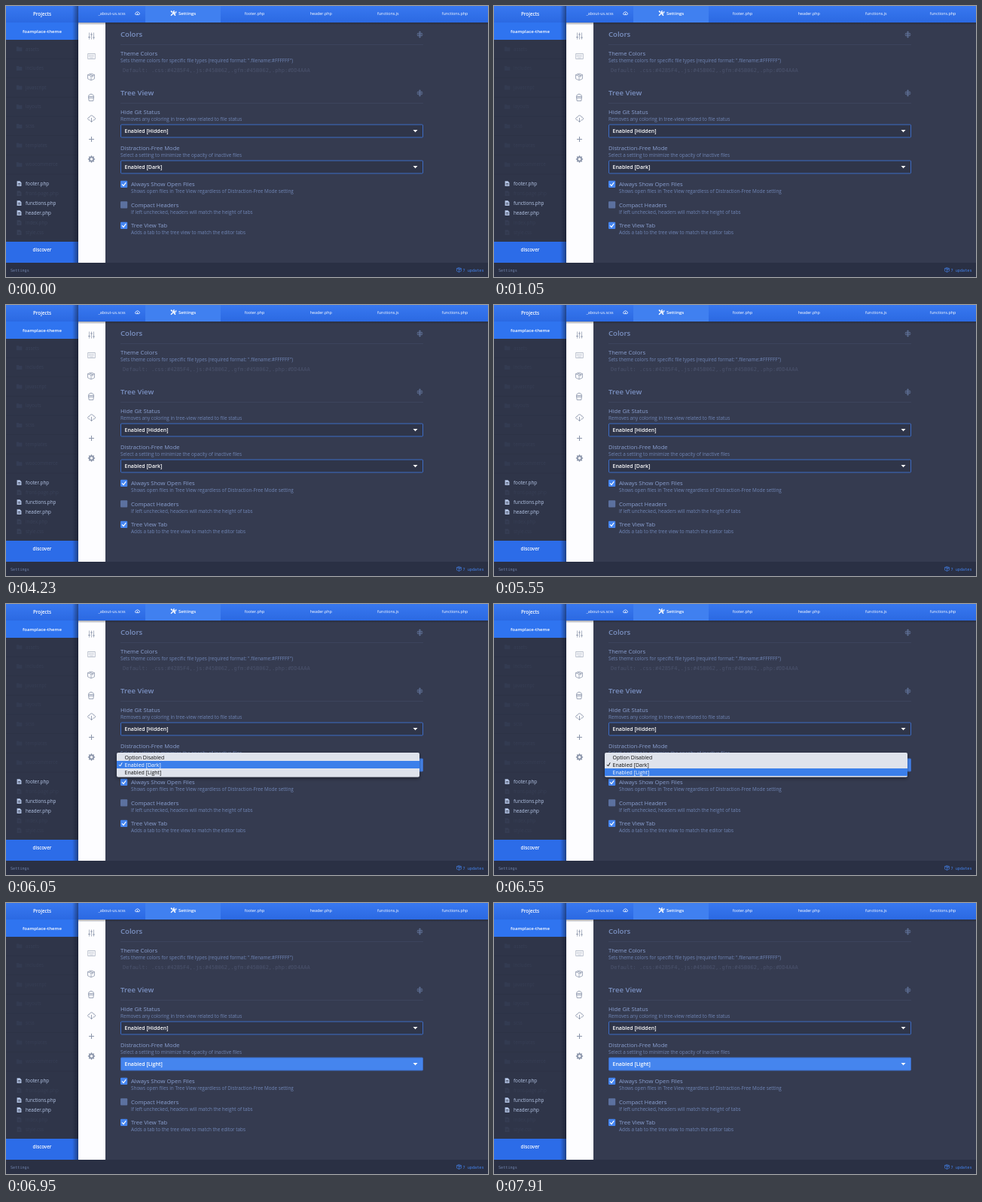
Recreate the animation shown at these times as an HTML page. Size 640 by 361 pixels, loop 8000 ms.

```html
<!DOCTYPE html>
<html lang="en">
<head>
<meta charset="utf-8">
<title>Editor settings</title>
<style>
html, body { margin: 0; width: 100%; height: 100%; overflow: hidden; background: #353b50; }
svg { display: block; width: 640px; height: 361px; }
text { font-family: "Open Sans", "Noto Sans", sans-serif; white-space: pre; }
.mono { font-family: "DejaVu Sans Mono", monospace; }
</style>
</head>
<body>
<svg id="stage" viewBox="0 0 640 361" xmlns="http://www.w3.org/2000/svg">
  <defs>
    <linearGradient id="bar" x2="0" y2="1">
      <stop offset="0" stop-color="#3878f0"/><stop offset="1" stop-color="#2b69e2"/>
    </linearGradient>
    <linearGradient id="shade" x2="0" y2="1">
      <stop offset="0" stop-color="#161b2b" stop-opacity=".4"/><stop offset="1" stop-color="#161b2b" stop-opacity="0"/>
    </linearGradient>
    <linearGradient id="edge">
      <stop offset="0" stop-color="#10162a" stop-opacity="0"/><stop offset="1" stop-color="#10162a" stop-opacity=".5"/>
    </linearGradient>
    <filter id="drop" x="-5%" y="-20%" width="110%" height="150%">
      <feDropShadow dx="0" dy="2" stdDeviation="2.5" flood-color="#000" flood-opacity=".4"/>
    </filter>
  </defs>
</svg>
<script>
const LOOP = 8000;
const FADE_IN = [1700, 2250], FADE_OUT = [3650, 4300];
const MENU_OPEN = 5850, MENU_PICK = 6400, MENU_FADE = [6690, 6870];
const DIM = 0.08;
const FIELD = '#2f3549', FOCUS = '#4585ee';
const stage = document.getElementById('stage');

function add(tag, attrs, parent = stage) {
  const el = document.createElementNS('http://www.w3.org/2000/svg', tag);
  for (const k in attrs) el.setAttribute(k, attrs[k]);
  parent.appendChild(el);
  return el;
}
const rect = (x, y, width, height, fill, more = {}, parent) =>
  add('rect', { x, y, width, height, fill, ...more }, parent);
const text = (x, y, str, size, fill, more = {}, parent) => {
  const el = add('text', { x, y, 'font-size': size, fill, ...more }, parent);
  el.textContent = str;
  return el;
};
const line = (d, stroke, x = 0, y = 0, more = {}, parent) =>
  add('path', { d, stroke, fill: 'none', 'stroke-width': 0.9, transform: `translate(${x} ${y})`, ...more }, parent);
const shape = (d, fill, x = 0, y = 0, parent) =>
  add('path', { d, fill, 'fill-rule': 'evenodd', transform: `translate(${x} ${y})` }, parent);

const bold = { 'font-weight': 600 };
const mid = { 'text-anchor': 'middle' };
const midBold = { ...mid, ...bold };

// Gear outline with eight teeth and a hole
function gear(r) {
  let d = '';
  for (let i = 0; i < 32; i++) {
    const a = (i - 0.5) * Math.PI / 16, q = i % 4 < 2 ? r : r * 0.76;
    d += (i ? 'L' : 'M') + (q * Math.cos(a)).toFixed(2) + ' ' + (q * Math.sin(a)).toFixed(2);
  }
  const h = r * 0.38;
  return `${d}ZM${h} 0A${h} ${h} 0 1 0 ${-h} 0A${h} ${h} 0 1 0 ${h} 0Z`;
}
const BOX = 'M0 -4.5L4.5 -2.8V2.4L0 4.5L-4.5 2.4V-2.8ZM-4.5 -2.8L0 -1L4.5 -2.8M0 -1V4.5M-2.2 -3.7L2.2 -1.9V.5';

// Main panel
rect(0, 0, 640, 361, '#353b50');

function heading(y, str) {
  text(152, y + 3.4, str, 9.6, '#7b91c2', bold);
  line('M0 -4V4M-4 0H4M-1.8 -2.5L0 -4L1.8 -2.5M-1.8 2.5L0 4L1.8 2.5M-3.5 -1.4H3.5M-3.5 1.4H3.5', '#7186b4', 549.5, y, { 'stroke-width': 0.6 });
  rect(152, y + 13, 402, 0.6, '#414a64');
}
const label = (x, y, str) => text(x, y, str, 7.6, '#8ba1d2');
const note = (x, y, str) => text(x, y, str, 6.37, '#7086b6');

function select(y, value) {
  const box = rect(152.5, y + 0.5, 401, 17, FIELD, { stroke: '#3d6cc4', rx: 1 });
  const str = text(157.5, y + 11.2, value, 7, '#fff', bold);
  shape('M-3 -1.5H3L0 1.8Z', '#fff', 543.5, y + 9);
  return { box, str };
}
function check(y, on, title, info) {
  rect(152, y, 9.2, 9.2, on ? '#4585f0' : '#5c719f', { rx: 1 });
  if (on) line('M2 4.7L4 6.8L7.3 2.4', '#fff', 152, y, { 'stroke-width': 1.2 });
  label(166, y + 7.4, title);
  note(166, y + 16.5, info);
}

heading(38, 'Colors');
label(152, 65.5, 'Theme Colors');
note(152, 74.7, 'Sets theme colors for specific file types (required format: ".filename:#FFFFFF")');
text(155, 88, 'Default: .css:#4285F4,.js:#45B062,.gfm:#45B062,.php:#DD4AAA', 7, '#4b536d', { class: 'mono' });
heading(116, 'Tree View');
label(152, 144, 'Hide Git Status');
note(152, 153, 'Removes any coloring in tree-view related to file status');
select(157.5, 'Enabled [Hidden]');
label(152, 192, 'Distraction-Free Mode');
note(152, 201, 'Select a setting to minimize the opacity of inactive files');
const mode = select(205.5, 'Enabled [Dark]');
check(232.7, true, 'Always Show Open Files', 'Shows open files in Tree View regardless of Distraction-Free Mode setting');
check(260.2, false, 'Compact Headers', 'If left unchecked, headers will match the height of tabs');
check(287.7, true, 'Tree View Tab', 'Adds a tab to the tree view to match the editor tabs');

// Icon strip
rect(96, 21, 36, 321, '#fdfdff');
const soft = '#b3bac8', ink = '#8d97ac';
line('M-3 -4.5V4.5M0 -4.5V4.5M3 -4.5V4.5', ink, 113.5, 40, { 'stroke-width': 0.7 });
line('M-4.3 1.5H-1.7M-1.3 -2H1.3M1.7 2H4.3', ink, 113.5, 40, { 'stroke-width': 1.2 });
line('M-4.8 -3.5H4.8V3.5H-4.8Z', soft, 113.5, 67);
line('M-3.5 -1.5H3.5M-3.5 .3H3.5M-2.3 2H2.3', soft, 113.5, 67, { 'stroke-dasharray': '1.2 .5' });
line(BOX, ink, 113, 94.5, { 'stroke-width': 0.8 });
line('M-3.6 -1.4H3.6L2.8 4.3H-2.8ZM-3.4 -1.6C-3.4 -5.6 3.4 -5.6 3.4 -1.6M-3.2 .4H3.2', ink, 113, 122);
line('M-2 2H-3C-5.8 1.5 -5 -2 -2.7 -1.8C-2 -5 2.4 -4.7 2.7 -2C5.8 -2 5.6 2 3 2H2M0 -1V4.6M-1.8 2.8L0 4.6L1.8 2.8', ink, 113.5, 150);
line('M-3.5 0H3.5M0 -3.5V3.5', ink, 113.5, 177.5, { 'stroke-width': 1.1 });
shape(gear(4.7), ink, 113.5, 204);

// Sidebar
rect(0, 0, 96, 342, '#2f3549');
const tree = add('g', {});
const idle = [], open = [];

['assets', 'includes', 'javascript', 'layouts', 'scss', 'templates', 'woocommerce'].forEach((name, i) => {
  const y = 57.3 + i * 25.65;
  rect(0, y + 12.5, 96, 0.6, '#2b3144', {}, tree);
  const g = add('g', {}, tree);
  shape('M0 -3H3L3.8 -2H7.6V3H0Z', '#6580b4', 13.8, y, g);
  text(26, y + 2.2, name, 6.2, '#8aa2d0', {}, g);
  idle.push(g);
});
['footer.php', 'front-page.php', 'functions.php', 'header.php', 'index.php', 'style.css'].forEach((name, i) => {
  const y = 236.6 + i * 13;
  const g = add('g', { fill: '#8aa2d0' }, tree);
  add('path', { d: 'M0 -3.4H3.8L5.8 -1.4V3.4H0ZM1.2 -.6V.1H4.6V-.6ZM1.2 1.2V1.9H4.6V1.2Z', 'fill-rule': 'evenodd', transform: `translate(14.6 ${y})` }, g);
  add('text', { x: 26, y: y + 2.2, 'font-size': 6.25 }, g).textContent = name;
  (i === 0 || i === 2 || i === 3 ? open : idle).push(g);
});

// Top bar
rect(96, 22, 544, 3.5, 'url(#shade)');
rect(0, 0, 640, 22, 'url(#bar)');
rect(0, 22, 96, 23, '#2f74f0');
rect(185, 0, 100, 22, '#4080f0');
text(48, 13, 'Projects', 6.25, '#fff', midBold);
text(48, 35.5, 'foamplace-theme', 6.1, '#fff', midBold);
[[140.5, '_about-us.scss'], [330, 'footer.php'], [418.3, 'header.php'], [507.3, 'functions.js'], [596, 'functions.php']]
  .forEach(([x, name]) => text(x, 11.8, name, 5.35, '#fff', { ...mid, 'font-weight': 500 }));
line('M-1.6 1.8C-3.6 1.8 -3.4 -.6 -1.7 -.6C-1.2 -2.8 1.5 -2.6 1.7 -.7C3.6 -.6 3.4 1.8 1.6 1.8ZM0 -.5V1.4', '#fff', 174.5, 9.8, { 'stroke-width': 0.8 });
line('M-3 3.2L2 -1.8M-3 -3L-.8 -.8M.8 .8L3 3', '#fff', 222, 9.6, { 'stroke-width': 1.5 });
line('M3.6 -2.6A1.8 1.8 0 1 1 1.6 -3.4', '#fff', 222, 9.6, { 'stroke-width': 1.1 });
text(229, 12, 'Settings', 6, '#fff', bold);

// Bottom
rect(0, 314, 96, 28, '#2c6ce8');
text(48, 327.3, 'discover', 6.2, '#fff', midBold);
rect(88, 0, 8, 342, 'url(#edge)');
rect(0, 342, 640, 19, '#2a3044');
text(6, 353.6, 'Settings', 5.15, '#7184ad', { class: 'mono' });
line(BOX, '#4585f0', 0, 0, { transform: 'translate(601.5 351.5) scale(.66)' });
text(606.5, 353.6, '7 updates', 5.2, '#4585f0', { class: 'mono' });

// Dropdown menu
const menu = add('g', {});
rect(147, 198, 402, 32.5, '#dfe3ec', { rx: 2, filter: 'url(#drop)' }, menu);
const glow = rect(147, 209, 402, 10, '#3b7fea', {}, menu);
const items = ['Option Disabled', 'Enabled [Dark]', 'Enabled [Light]'].map((name, i) =>
  text(157.5, 206.9 + i * 9.8, name, 7, '#111', { 'font-weight': 500 }, menu));
const tick = line('M0 0L1.6 2L4.2 -2.6', '#fff', 150, 214, { 'stroke-width': 1 }, menu);

const clamp = v => Math.min(1, Math.max(0, v));
const ramp = (t, [a, b]) => clamp((t - a) / (b - a));
const ease = v => v * v * (3 - 2 * v);
const mix = (a, b, v) => `rgb(${a.map((c, i) => Math.round(c + (b[i] - c) * v))})`;

function draw(t) {
  const lit = ease(ramp(t, FADE_IN)) - ease(ramp(t, FADE_OUT));
  const rest = 0.04 * (1 - ramp(t, [0, 300]));
  idle.forEach(g => g.setAttribute('opacity', DIM + rest + (1 - DIM - rest) * lit));
  open.forEach(g => g.setAttribute('fill', mix([182, 199, 232], [138, 162, 208], lit)));

  const shown = t >= MENU_OPEN && t < MENU_FADE[1];
  const picked = t >= MENU_PICK;
  menu.setAttribute('visibility', shown ? 'visible' : 'hidden');
  menu.setAttribute('opacity', 1 - ramp(t, MENU_FADE));
  glow.setAttribute('y', picked ? 219 : 209);
  items[1].setAttribute('fill', picked ? '#111' : '#fff');
  items[2].setAttribute('fill', picked ? '#fff' : '#111');
  tick.setAttribute('stroke', picked ? '#111' : '#fff');

  mode.box.setAttribute('fill', t >= MENU_OPEN ? FOCUS : FIELD);
  mode.str.textContent = t >= MENU_FADE[1] ? 'Enabled [Light]' : 'Enabled [Dark]';
}

function play(now) {
  draw(now % LOOP);
  requestAnimationFrame(play);
}
draw(0);
requestAnimationFrame(play);
</script>
</body>
</html>
```
